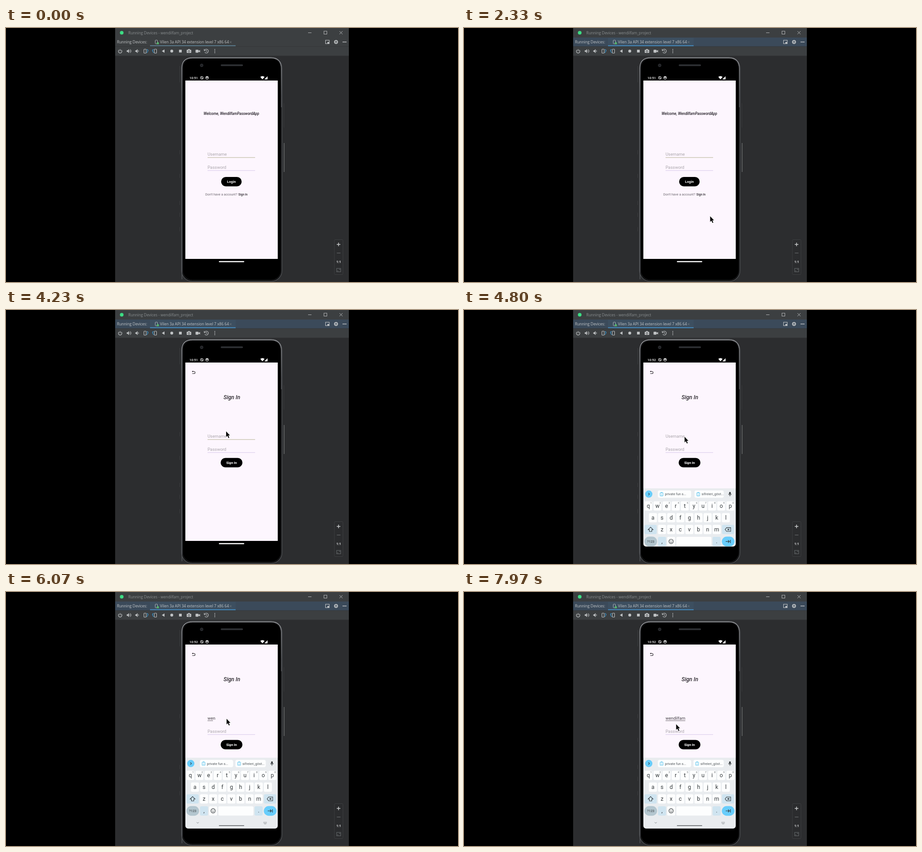
Animation of 998 by 561 pixels, one loop 8 s. Source, as an HTML page with a canvas:

```html
<!DOCTYPE html>
<html lang="en">
<head>
<meta charset="utf-8">
<title>Password app demo</title>
<style>
html, body { margin: 0; width: 100%; height: 100%; overflow: hidden; background: #000; }
canvas { display: block; width: 998px; height: 561px; }
</style>
</head>
<body>
<canvas id="stage"></canvas>
<script>
const W = 998, H = 561, LOOP = 8000;
const FOCUS = 900, PAGE = 3560, MINUTE = 4600, KEYS = 4640, NAV = 5000;
const TYPE_START = 5580, TYPE_STEP = 230, WORD = 'wendilfam';
const UI = '"Open Sans", sans-serif', APP = 'Roboto, sans-serif';

const canvas = document.getElementById('stage');
const ctx = canvas.getContext('2d');
const dpr = window.devicePixelRatio || 1;
canvas.width = W * dpr;
canvas.height = H * dpr;

const clamp = v => Math.max(0, Math.min(1, v));
const ease = v => v * v * (3 - 2 * v);
const progress = (t, from, to) => clamp((t - from) / (to - from));

function rect(x, y, w, h, color) {
  ctx.fillStyle = color;
  ctx.fillRect(x, y, w, h);
}
function round(x, y, w, h, r, fill, stroke, lw = 1) {
  ctx.beginPath();
  ctx.roundRect(x, y, w, h, r);
  if (fill) { ctx.fillStyle = fill; ctx.fill(); }
  if (stroke) { ctx.strokeStyle = stroke; ctx.lineWidth = lw; ctx.stroke(); }
}
function circle(x, y, r, fill, stroke, lw = 1) {
  ctx.beginPath();
  ctx.arc(x, y, r, 0, Math.PI * 2);
  if (fill) { ctx.fillStyle = fill; ctx.fill(); }
  if (stroke) { ctx.strokeStyle = stroke; ctx.lineWidth = lw; ctx.stroke(); }
}
function line(d, color, lw = 1) {
  ctx.strokeStyle = color;
  ctx.lineWidth = lw;
  ctx.stroke(new Path2D(d));
}
function shape(d, color) {
  ctx.fillStyle = color;
  ctx.fill(new Path2D(d));
}
function text(s, x, y, size, color, { family = APP, style = '', align = 'left' } = {}) {
  ctx.font = `${style} ${size}px ${family}`;
  ctx.textAlign = align;
  ctx.fillStyle = color;
  ctx.fillText(s, x, y);
}
const center = (s, x, y, size, color, style = '') =>
  text(s, x, y, size, color, { style, align: 'center' });

function toolbar() {
  const c = '#bfc2c4', blue = '#3b9ad4';
  ctx.beginPath();
  ctx.arc(252, 51.5, 3.8, -0.9, Math.PI + 0.9);
  ctx.strokeStyle = c;
  ctx.lineWidth = 1.3;
  ctx.stroke();
  line('M252 46.8v4.4', c, 1.3);
  for (const x of [271, 290]) {
    shape(`M${x - 4.5} 49.5h2l3-3v9l-3-3h-2z`, c);
    line(`M${x + 2} 49q2 2 0 4`, c);
  }
  line('M274 47q4.5 4 0 8', c);
  for (const [x, dir] of [[309, 1], [328, -1]]) {
    round(x - 2.5 - dir * 2, 46.7, 5, 8.8, 1, null, c, 1.1);
    line(`M${x + dir * 2} 47.5q${dir * 4} 1 ${dir * 2} 4t${dir * -2} 3.5`, blue, 1.3);
  }
  shape('M344 51l6-3.8v7.6z', c);
  circle(366, 51, 3.2, c);
  rect(382, 48, 6, 6, c);
  round(399, 48, 10, 7, 1, c);
  rect(402, 46.6, 4, 2, c);
  circle(404, 51.5, 2, null, '#3c3f41');
  round(418.5, 48, 6.5, 6.5, 1, c);
  shape('M425 50.5l3.5-2v5.5l-3.5-2z', c);
  ctx.beginPath();
  ctx.arc(442.5, 51, 4.3, -2.8, 2.5);
  ctx.strokeStyle = c;
  ctx.lineWidth = 1.1;
  ctx.stroke();
  line('M437.5 46.5v3.5h3.5M442.5 48.5v3l2 1', c);
  for (const y of [47.5, 51, 54.5]) circle(461, y, 1, c);
}

function ideWindow(focused) {
  rect(0, 0, W, H, '#000');
  rect(241, 0, 516, 561, '#2c2d2f');
  rect(241, 0, 516, 62, '#3c3f41');
  rect(241, 21, 516, 20, focused ? '#3b4a5a' : '#3c3f41');
  if (focused) rect(318, 22, 189, 17, '#3d4f60');
  rect(318, 38, 189, 2.5, focused ? '#4484b4' : '#587686');
  rect(241, 40.5, 516, 0.8, '#323537');
  rect(241, 61, 516, 1, '#313335');

  circle(255.5, 10.5, 4, '#3ddc84');
  text('Running Devices - wendilfam_project', 270, 13.7, 8.4, '#8a8f90', { family: UI });
  line('M667 10.5h7.5', '#b4b6b8');
  ctx.strokeStyle = '#b4b6b8';
  ctx.strokeRect(702, 7, 6.5, 6.5);
  line('M736.3 7l6.8 6.8M743.1 7l-6.8 6.8', '#b4b6b8');

  text('Running Devices:', 245, 34.1, 8.4, '#c2c5c7', { family: UI });
  round(329.5, 26.8, 5, 8, 1, null, '#afb5b9');
  rect(333, 31.5, 4.5, 4.5, '#55b36c');
  text('Vilen 3a API 34 extension level 7 x86 64', 340, 34.1, 8.4, '#c2c5c7', { family: UI });
  line('M494 29.3l4 4M498 29.3l-4 4', '#777d81', 0.9);
  ctx.strokeStyle = '#c0c3c5';
  ctx.lineWidth = 1.1;
  ctx.strokeRect(705.5, 27, 8.2, 7.6);
  rect(709.5, 31, 4, 3.5, '#c0c3c5');
  circle(728.7, 30.8, 2.7, null, '#c0c3c5', 1.9);
  for (let i = 0; i < 8; i++) {
    const a = i * Math.PI / 4;
    circle(728.7 + Math.cos(a) * 4, 30.8 + Math.sin(a) * 4, 0.9, '#c0c3c5');
  }
  rect(743, 30.2, 9, 1.4, '#c0c3c5');
  toolbar();

  round(725, 467.5, 19, 77, 2, '#2b2c2e', '#3d3f41');
  line('M730.3 478h8M734.3 474v8', '#cfd1d2', 1.4);
  line('M730.5 497h8', '#696c6e', 1.2);
  text('1:1', 734.5, 518.8, 7.4, '#cfd1d2', { family: UI, style: 'bold', align: 'center' });
  ctx.strokeStyle = '#696c6e';
  ctx.lineWidth = 1;
  ctx.strokeRect(730, 531, 9, 7.5);
  line('M732 535.5v1.2h1.5M735.5 533h1.7v1.5', '#696c6e');
}

function phone(minute) {
  rect(613.5, 254, 1.2, 64, '#77797a');
  rect(613.3, 166, 0.8, 54, '#3d3f41');
  rect(383, 84, 1, 36, '#3a3c3e');
  for (const y of [270, 322, 382, 408, 440]) rect(383, y, 0.9, 9, '#3b3d3f');
  round(387.5, 64.5, 222, 495, 24, '#000', '#4c4e51', 1.6);
  round(389.8, 67, 217.6, 490, 22, null, '#2d2e32', 1);
  const shine = ctx.createLinearGradient(0, 64, 0, 150);
  shine.addColorStop(0, '#a0a2a6');
  shine.addColorStop(1, '#55575b');
  line('M388.5 555V88Q388.5 66 412 66H585Q608 66 608 90V175', shine, 1.4);
  circle(432, 82.5, 3.2, '#202124', '#34363a');
  round(474, 80.3, 49, 4, 2, '#25272a');
  for (let x = 476; x < 522; x += 3) rect(x, 81, 1.5, 2.4, '#3b3d40');

  text(minute, 405, 112.8, 7.4, '#f2f2f2', { style: '500' });
  circle(432.5, 110, 2.8, null, '#e8e8e8', 1.1);
  line('M429.8 107l5.4 6', '#e8e8e8');
  circle(444, 110, 2.9, null, '#e8e8e8', 1.1);
  rect(442, 108, 4, 1.8, '#e8e8e8');
  shape('M561.5 108q4.7-3.6 9.4 0l-4.7 5.6z', '#fff');
  shape('M577.5 106.5v7h-7z', '#fff');
  rect(396, 116, 204, 394, '#fdf6fe');
  round(470, 514.8, 56, 2.4, 1.2, '#fff');
}

function field(hint, y, lineColor) {
  text(hint, 445, y, 9.4, '#aaa5ab');
  if (lineColor) rect(445, y + 3.2, 105, 0.9, lineColor);
}

function button(label, x, y, w, size) {
  round(x, y, w, 20.8, 10.4, '#000');
  center(label, x + w / 2, y + 13.1, size, '#fff', 'bold');
}

function loginPage(t) {
  center('Welcome, WendilfamPasswordApp', 497.5, 192, 8.1, '#1f1b22', 'italic 500');
  field('Username', 282.4, '#aaa783');
  field('Password', 311.2, '#cfc0e6');
  button('Login', 475, 329, 45.3, 7.7);
  text("Don't have a account?", 440, 370.2, 7.3, '#6d686f');
  const ripple = progress(t, 3200, 3310);
  if (ripple > 0) circle(524.5, 366, 3 + 5.5 * ripple, 'rgba(120,115,120,.27)');
  text('Sign In', 513, 370.2, 6.6, '#2a262c', { style: '500' });
}

function signInPage(t) {
  line('M413 136l-1.8 0M412 135.8h3.2a2.3 2.3 0 0 1 0 4.7h-4', '#2b272d', 1.1);
  shape('M410.5 135.8l2.6-1.8v3.6z', '#2b272d');
  center('Sign In', 498.7, 197.3, 12.4, '#2b272d', 'italic 500');

  const count = Math.floor((t - TYPE_START) / TYPE_STEP) + 1;
  const marked = Math.floor((t - 60 - TYPE_START) / TYPE_STEP) + 1;
  if (count > 0) {
    text(WORD.slice(0, count), 445, 282.4, 9.4, '#454047');
    const w = ctx.measureText(WORD.slice(0, Math.max(0, marked))).width;
    rect(445, 283.8, w, 0.8, '#454047');
  } else {
    field('Username', 282.4, t < KEYS ? '#aaa783' : null);
  }
  field('Password', 311.2, '#cfc0e6');
  button('Sign In', 474, 326.8, 48, 7.6);
}

function key(x, y, w, label, fill = '#fdfefe') {
  round(x - w / 2, y - 10.2, w, 20.4, 3, fill);
  if (label) center(label, x, y + 3.7, 12.4, '#33383b');
}

function chip(x, right, label) {
  round(x, 370.8, right - x, 16.2, 4, '#fdfefe');
  round(x + 5, 375.8, 6.5, 7, 1, null, '#69c8ee', 1.1);
  rect(x + 6.8, 374.5, 3, 2, '#69c8ee');
  line(`M${x + 6.8} 379.2h3M${x + 6.8} 381h3`, '#69c8ee', 0.7);
  text(label, x + 15.5, 381.6, 7.5, '#50565a');
}

function keyboard(t) {
  const ink = '#33383b', tint = '#cfe4f0', accent = '#68cdfb';
  const up = ease(progress(t, KEYS, KEYS + 220));
  if (up <= 0) return;
  ctx.save();
  ctx.beginPath();
  ctx.roundRect(396, 366, 204, 156.5, [0, 0, 6, 6]);
  ctx.clip();
  ctx.translate(0, (1 - up) * 157);
  rect(396, 366, 204, 157, '#e9ecef');

  circle(408, 378.8, 8, accent);
  line('M407 376.3l2.5 2.5-2.5 2.5', ink, 1.1);
  chip(428, 501.5, 'private fun s...');
  chip(509 - 2.5 * progress(t, 4930, 5030), 573.5, 'sifreleri_göst...');
  round(585.4, 374, 3.6, 6, 1.8, ink);
  line('M584 378a3.2 3.2 0 0 0 6.4 0M587.2 381.3v2.4', ink, 0.9);

  const rows = [['qwertyuiop', 407, 405], ['asdfghjkl', 417.2, 431], ['zxcvbnm', 437.2, 457]];
  for (const [letters, x0, y] of rows) {
    [...letters].forEach((ch, i) => key(x0 + i * 20.12, y, 17.8, ch));
  }
  for (let i = 0; i < 10; i++) {
    center(String((i + 1) % 10), 413 + i * 20.12, 400, 5, '#596064');
  }

  key(412, 457, 27, '', tint);
  line('M412 451.8l5.5 5.5h-2.8v4.2h-5.4v-4.2h-2.8z', ink, 1.1);
  key(583, 457, 27, '', tint);
  line('M576.5 457l3.3-4.2h9v8.4h-9zM581.8 455l4 4M585.8 455l-4 4', ink, 1.1);

  round(398.3, 472.8, 28, 21.4, 10.7, '#b3c6cf');
  center('?123', 412.3, 486.3, 7.4, ink);
  key(437.2, 483.5, 17.8, ',', tint);
  key(457.3, 483.5, 17.8);
  circle(457.3, 483.3, 4.9, null, ink, 1.1);
  circle(455.5, 482, 0.8, ink);
  circle(459.1, 482, 0.8, ink);
  line('M454.7 484.5q2.6 3 5.2 0', ink);
  key(507.6, 483.5, 77.5);
  key(557.8, 483.5, 17.8, '.', tint);
  round(569.3, 472.8, 28, 21.4, 10.7, accent);
  line('M577.8 483.5h8M583 480.5l3 3-3 3M588.3 480v7', ink, 1.2);

  line('M421 508.5l2.3 2.3 2.3-2.3', '#747a7e');
  for (const y of [507.8, 509.8]) {
    for (let x = 568.5; x < 576; x += 2) rect(x, y, 1.2, 1.1, '#858b8f');
  }
  rect(570, 511.7, 4.5, 0.9, '#858b8f');
  if (t >= NAV) round(470, 515, 56, 2, 1, '#7b7f82');
  ctx.restore();
}

// Pointer stops: time, x, y
const stops = [
  [2200, 545, 420], [3000, 523.8, 361.5], [3650, 523.8, 361.5], [4150, 486, 268],
  [4260, 486, 268], [4500, 487, 280], [7450, 487, 280], [7880, 468.4, 292]
];
function pointer(t) {
  if (t < stops[0][0]) return;
  let [, x, y] = stops[0];
  for (let i = 1; i < stops.length; i++) {
    const [t0, x0, y0] = stops[i - 1], [t1, x1, y1] = stops[i];
    if (t < t0) break;
    const p = ease(progress(t, t0, t1));
    x = x0 + (x1 - x0) * p;
    y = y0 + (y1 - y0) * p;
  }
  const d = `M${x} ${y}v12.4l2.8-2.6 2.2 5 2.1-.9-2.2-4.9h3.6z`;
  line(d, 'rgba(255,255,255,.8)', 1.2);
  shape(d, '#080808');
}

function draw(t) {
  ctx.setTransform(dpr, 0, 0, dpr, 0, 0);
  ideWindow(t >= FOCUS);
  phone(t < MINUTE ? '10:51' : '10:52');
  if (t < PAGE) loginPage(t);
  else signInPage(t);
  keyboard(t);
  pointer(t);
}

const start = performance.now();
function frame() {
  draw((performance.now() - start) % LOOP);
  requestAnimationFrame(frame);
}
frame();
</script>
</body>
</html>
```
